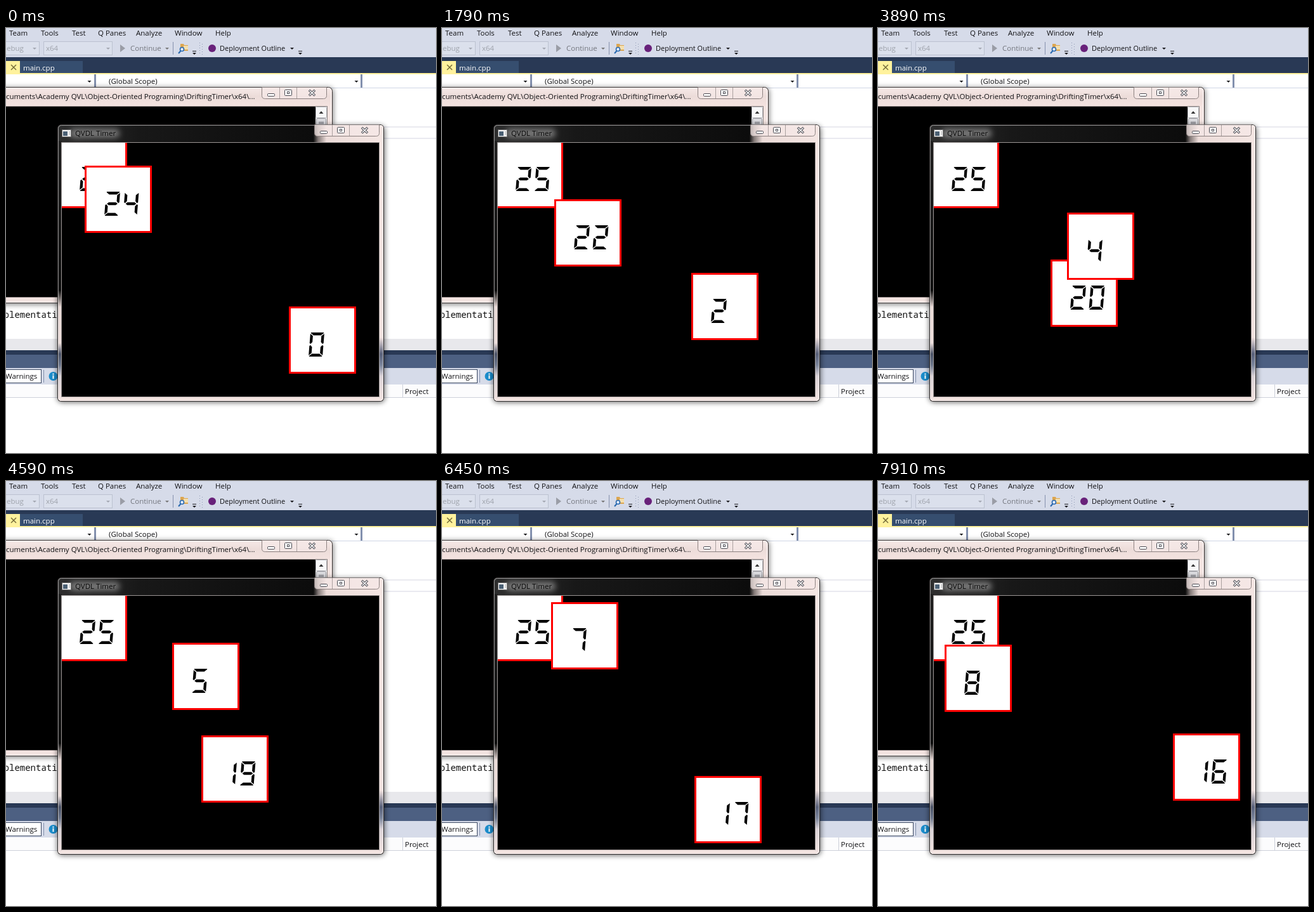
An HTML page for the animation above (8 s loop, 678 px wide and 670 px high).

```html
<!DOCTYPE html>
<html lang="en">
<head>
<meta charset="utf-8">
<title>Bouncing counters</title>
<style>
html, body { margin: 0; width: 100%; height: 100%; overflow: hidden; background: #fff; }
svg { display: block; width: 678px; height: 670px; }
text { font: 11.5px "Open Sans", sans-serif; fill: #111114; white-space: pre; }
.code { font: 14px "Noto Sans Mono", monospace; fill: #111; }
.off { fill: #9ea2ab; }
</style>
</head>
<body>
<svg id="stage" viewBox="0 0 678 670">
  <defs>
    <filter id="soft" x="-20%" y="-80%" width="140%" height="260%"><feGaussianBlur stdDeviation="5"/></filter>
    <filter id="shade" x="-10%" y="-10%" width="120%" height="120%"><feGaussianBlur stdDeviation="4"/></filter>
    <linearGradient id="pane" x1="0" y1="0" x2="0" y2="1">
      <stop offset="0" stop-color="#f6e9e7"/><stop offset=".45" stop-color="#ecdcd9"/><stop offset="1" stop-color="#f4e3e0"/>
    </linearGradient>
    <linearGradient id="glass" gradientUnits="userSpaceOnUse" x1="82" y1="0" x2="595" y2="0">
      <stop offset="0" stop-color="#2e2e2e"/><stop offset=".25" stop-color="#181818"/>
      <stop offset=".785" stop-color="#0c0c0c"/>
      <stop offset=".8" stop-color="#857b79"/><stop offset=".825" stop-color="#ecdcd9"/><stop offset="1" stop-color="#f4e6e3"/>
    </linearGradient>
    <linearGradient id="leftEdge" gradientUnits="userSpaceOnUse" x1="0" y1="152" x2="0" y2="588">
      <stop offset="0" stop-color="#222"/><stop offset=".6" stop-color="#0d0d0d"/>
      <stop offset=".66" stop-color="#e9dad7"/><stop offset=".79" stop-color="#eddedb"/>
      <stop offset=".83" stop-color="#4a5266"/><stop offset=".87" stop-color="#6d778c"/>
      <stop offset=".91" stop-color="#d9d2d6"/><stop offset="1" stop-color="#f3e4e1"/>
    </linearGradient>
    <linearGradient id="rightEdge" gradientUnits="userSpaceOnUse" x1="0" y1="152" x2="0" y2="588">
      <stop offset="0" stop-color="#f4e6e3"/><stop offset=".77" stop-color="#f2e3e0"/>
      <stop offset=".83" stop-color="#59617a"/><stop offset=".87" stop-color="#7c869c"/>
      <stop offset=".91" stop-color="#dcd4d8"/><stop offset="1" stop-color="#f3e4e1"/>
    </linearGradient>
    <clipPath id="client"><rect x="88" y="181" width="500" height="400"/></clipPath>
  </defs>

  <rect width="678" height="670" fill="#fff"/>

  <!-- menu and toolbar -->
  <rect width="678" height="46" fill="#d6dbe9"/>
  <g id="menu"></g>
  <g fill="#dbe0ec" stroke="#bbc1d0">
    <rect x="-5.5" y="21.5" width="58" height="21"/>
    <rect x="59.5" y="21.5" width="108" height="21"/>
  </g>
  <text class="off" x="1" y="36">ebug</text>
  <text class="off" x="63" y="36">x64</text>
  <path d="M180 26l8 6-8 6z" fill="#9a9da6"/>
  <text x="196" y="36" style="fill:#74777f">Continue</text>
  <path d="M263.5 22v20" stroke="#8591ad"/>
  <path d="M275 25h5l1 2h6v9h-12z" fill="#dca650"/>
  <path d="M280 28h7v6h-7z" fill="#f4dfae"/>
  <circle cx="277.5" cy="33.5" r="3" fill="#e4edfa" stroke="#2869b0" stroke-width="1.6"/>
  <path d="M275.5 36l-3.5 4" stroke="#2869b0" stroke-width="2"/>
  <path d="M294 36.5h6M461 36.5h6" stroke="#1b1b1f"/>
  <path d="M305.5 23v19M309.5 25v17" stroke="#8d98b3" stroke-dasharray="1 3"/>
  <circle cx="325" cy="32" r="6" fill="#68217a"/>
  <text x="337" y="36" style="font-size:11px">Deployment Outline</text>

  <!-- tabs and editor -->
  <rect y="46" width="678" height="26" fill="#293955"/>
  <rect y="52" width="22" height="20" fill="#fff29d"/>
  <path d="M8 58l8 8M16 58l-8 8" stroke="#756b3a" stroke-width="1.5"/>
  <rect x="22" y="52" width="99" height="19" fill="#364e6f"/>
  <text x="27" y="67" style="fill:#fff">main.cpp</text>
  <rect y="71" width="678" height="2" fill="#fff29d"/>
  <path d="M0 94.5h678" stroke="#cfd6e5"/>
  <path d="M140.5 73v21M560.5 73v21" stroke="#8390ae" stroke-width="3"/>
  <text x="162" y="88">(Global Scope)</text>
  <g id="arrows"></g>
  <path d="M500 156h178M500 174h178" stroke="#eaeaf0" stroke-width="2"/>
  <text class="code" x="-3.4" y="457">plementati</text>
  <rect y="490" width="678" height="18" fill="#e8e8ec"/>

  <!-- lower panel -->
  <rect y="508" width="678" height="7" fill="#293955"/>
  <rect y="515" width="678" height="21" fill="#4d6082"/>
  <rect y="536" width="678" height="26" fill="#d6dbe9"/>
  <rect x="-5.5" y="538.5" width="61" height="21" fill="#fff" stroke="#3c4962"/>
  <text x="-1" y="553">Warnings</text>
  <path d="M59.5 539v20" stroke="#8591ad"/>
  <circle cx="74.5" cy="549" r="7" fill="#1b8ccb"/>
  <path d="M74.5 547.5v5.5M74.5 544.5v2" stroke="#fff" stroke-width="2"/>
  <rect y="562" width="678" height="20" fill="#fcfcfd"/>
  <path d="M0 582.5h678M625.5 562v20" stroke="#cdd0da"/>
  <text x="629" y="577">Project</text>

  <!-- console window -->
  <rect x="-20" y="94" width="536" height="342" rx="7" filter="url(#shade)" opacity=".5"/>
  <rect x="-20.5" y="93.5" width="535" height="340" rx="6" fill="#f3e4e1" stroke="#3b3535"/>
  <rect x="-20" y="94.5" width="533" height="29" rx="5" fill="url(#pane)"/>
  <rect x="-20.5" y="94.5" width="533" height="338" rx="5" fill="none" stroke="#fff" opacity=".65"/>
  <text x="0" y="112">cuments\Academy QVL\Object-Oriented Programing\DriftingTimer\x64\...</text>
  <rect y="123" width="507" height="302" fill="#8b8281"/>
  <rect y="124" width="488" height="300"/>
  <rect x="488" y="124" width="18" height="300" fill="#eeeef0"/>
  <rect x="488.5" y="124.5" width="17" height="17" rx="2" fill="#f7f7f8" stroke="#b5b5ba"/>
  <path d="M493.5 135l3.5-4 3.5 4z" fill="#333"/>
  <rect x="489.5" y="142.5" width="15" height="20" rx="2" fill="#d9d9dd" stroke="#96969c"/>
  <path d="M493 148.5h8M493 150.5h8" stroke="#6f6f76"/>
  <g class="buttons" transform="translate(403 93)"></g>

  <!-- front window -->
  <rect x="81" y="154" width="516" height="436" rx="7" filter="url(#shade)" opacity=".62"/>
  <rect x="81" y="152" width="515" height="437" rx="6" fill="#2d2929"/>
  <rect x="82" y="153" width="513" height="435" rx="5" fill="#f3e4e1"/>
  <path d="M82 180v-22q0-5 5-5h503q5 0 5 5v22z" fill="url(#glass)"/>
  <path d="M82 178h6v410q-6 0-6-6z" fill="url(#leftEdge)"/>
  <path d="M588 178h7v404q0 6-6 6h-1z" fill="url(#rightEdge)"/>
  <rect x="82.5" y="153.5" width="512" height="434" rx="5" fill="none" stroke="#fff" opacity=".5"/>
  <rect x="101" y="159" width="78" height="14" rx="6" fill="#a0a0a0" opacity=".7" filter="url(#soft)"/>
  <rect x="88.5" y="160.5" width="14" height="11" fill="#f5f5f5" stroke="#777"/>
  <rect x="90" y="163" width="7" height="7" fill="#4b6074"/>
  <path d="M99 164h2M99 167h2" stroke="#888"/>
  <text x="109" y="170" style="fill:#080808">QVDL Timer</text>
  <g class="buttons" transform="translate(486 152)"></g>
  <rect x="87" y="180" width="502" height="402" fill="#9c9695"/>
  <rect x="88" y="181" width="500" height="400"/>
  <g clip-path="url(#client)" id="boxes"></g>
</svg>
<script>
const LOOP = 8000, H = 38, W = 22;
const $ = id => document.getElementById(id);

$('menu').innerHTML = [['Team', 5], ['Tools', 55], ['Test', 104], ['Q Panes', 145],
  ['Analyze', 205], ['Window', 266], ['Help', 330]]
  .map(([s, x]) => `<text x="${x}" y="12">${s}</text>`).join('');

const dark = '#1b1b1f', pale = '#a4a8b2';
$('arrows').innerHTML = [[45, 31, pale], [161, 31, pale], [254, 31, '#777'], [297, 39, dark],
  [451, 31, dark], [464, 39, dark], [131.5, 83, dark], [552.5, 83, dark]]
  .map(([x, y, c]) => `<path d="M${x - 3} ${y}h6l-3 3z" fill="${c}"/>`).join('');

for (const g of document.querySelectorAll('.buttons')) g.innerHTML = `
  <path d="M.5 .5v13q0 5 5 5h92q5 0 5-5v-13" fill="#f6e9e7" fill-opacity=".75" stroke="#8c8180"/>
  <path d="M28.5 1v17M55.5 1v17" stroke="#aaa09f"/>
  <g fill="#fff" stroke="#4a4a52">
    <rect x="9.5" y="10.5" width="11" height="4" rx="1"/>
    <rect x="36.5" y="4.5" width="11" height="9" rx="1"/><rect x="40.5" y="7.5" width="3" height="3"/>
  </g>
  <path d="M75 5l9 8.5M84 5l-9 8.5" stroke="#4a4a52" stroke-width="3.6"/>
  <path d="M75.5 5.5l8 7.5M83.5 5.5l-8 7.5" stroke="#fff" stroke-width="1.5"/>`;

// seven-segment digits: three base shapes, mirrored, then slanted
const bar = [[.5, .8], [1.5, 0], [20.5, 0], [21.5, .8], [17, 4.4], [5, 4.4]];
const post = [[0, 2], [4.3, 5.6], [4.3, 15], [1.8, 18], [0, 17]];
const mid = [[2.6, 19], [5.4, 16.8], [16.6, 16.8], [19.4, 19], [16.6, 21.2], [5.4, 21.2]];
const seg = (pts, flipX, flipY) => 'M' + pts.map(([x, y]) => {
  if (flipX) x = W - x;
  if (flipY) y = H - y;
  return (x + (H - y) * .08).toFixed(2) + ' ' + y;
}).join('L') + 'z';
const segs = {
  a: seg(bar), b: seg(post, 1), c: seg(post, 1, 1), d: seg(bar, 0, 1),
  e: seg(post, 0, 1), f: seg(post), g: seg(mid)
};
const lit = ['abcdef', 'bc', 'abged', 'abgcd', 'fgbc', 'afgcd', 'afgedc', 'abc', 'abcdefg', 'abcdfg'];
const digits = n => [...String(n)].map((d, i) =>
  `<path transform="translate(${31 + i * 29.5} 41)" d="${[...lit[d]].map(s => segs[s]).join('')}"/>`).join('');

$('boxes').innerHTML = '<g><rect x="1.5" y="1.5" width="103" height="103" fill="#fff" stroke="red" stroke-width="3"/><g></g></g>'.repeat(3);
const boxes = [...$('boxes').children];

function place(box, x, y, n) {
  box.setAttribute('transform', `translate(${x} ${y})`);
  if (box.value !== n) {
    box.value = n;
    box.lastChild.innerHTML = digits(n);
  }
}

// runs of ten even intervals; the picture holds between steps
const runs = [[0, 0], [70, 70], [230, 1000], [1100, 1870], [1950, 2710], [2790, 3570], [3650, 4430],
  [4510, 5290], [5370, 6150], [6220, 6980], [7060, 7830], [7910, 7910]];
const keys = [[0, 124], [70, 125], [850, 148], [1000, 152], [1870, 182], [2710, 221], [3570, 259],
  [3890, 272], [4430, 300], [5290, 342], [6150, 381], [6220, 385], [6450, 398], [6980, 424], [7830, 461], [7910, 465]];

function stepTime(t) {
  const [a, b] = runs.filter(r => r[0] <= t).pop();
  if (a === b) return a;
  const n = Math.min(10, Math.floor((t - a) / (b - a) * 10 + 1e-6));
  return a + (b - a) * n / 10;
}

function track(t) {
  const i = keys.findIndex(k => k[0] >= t);
  const [t1, x1] = keys[i];
  if (t1 === t) return x1;
  const [t0, x0] = keys[i - 1];
  return Math.round(x0 + (x1 - x0) * (t - t0) / (t1 - t0));
}

function draw(t) {
  const s = stepTime(t), x = track(s), off = Math.abs(x - 385);
  const count = Math.floor((s - 150) / 1000) + 1;
  place(boxes[1], x, 478 - off, 24 - count);
  place(boxes[2], 570 - x, 178 + off, count);
}

place(boxes[0], 85, 178, 25);
const start = performance.now();
function tick() {
  draw((performance.now() - start) % LOOP);
  requestAnimationFrame(tick);
}
tick();
</script>
</body>
</html>
```
